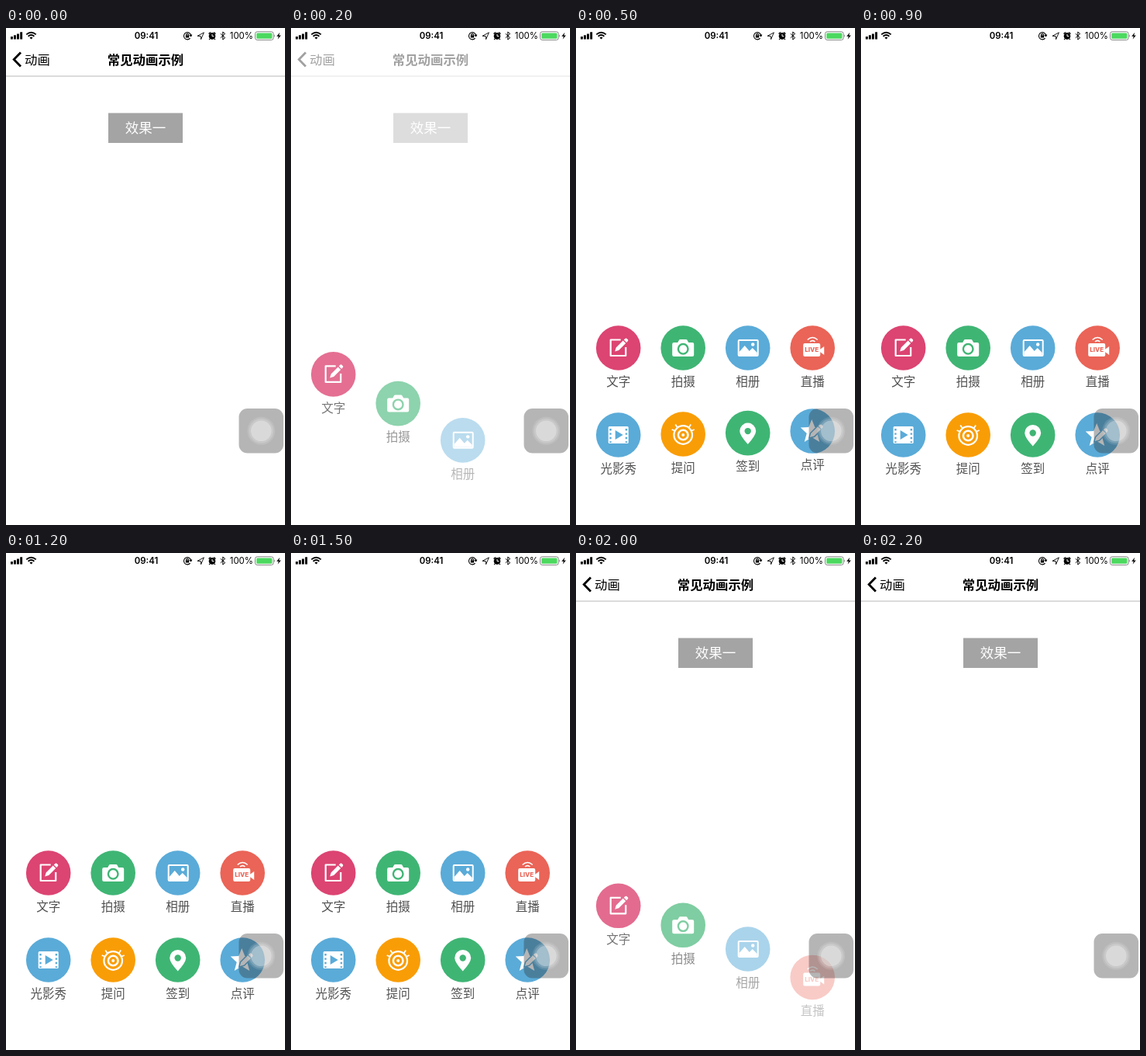
Write an HTML page that moves like this. It is 360 px wide and 640 px high and loops after 2300 ms.

```html
<!DOCTYPE html>
<html lang="zh-CN">
<head>
<meta charset="utf-8">
<title>动画</title>
<style>
  html, body { margin: 0; width: 100%; height: 100%; overflow: hidden; background: #fff; }
  svg { display: block; width: 360px; height: 640px; }
  text { font-family: "Noto Sans CJK SC", "Noto Sans CJK", sans-serif; }
  .mid { text-anchor: middle; }
  .latin { font-family: Inter, Roboto, sans-serif; font-size: 11.4px; }
  .label { font-size: 15.5px; fill: #505050; text-anchor: middle; }
  .line { fill: none; stroke: #fff; }
  .thin { fill: none; stroke: #000; }
</style>
</head>
<body>
<svg viewBox="0 0 360 640">
  <defs>
    <g id="edit">
      <path class="line" d="M3-10.5H-10V10H9.5V-1" stroke-width="2.2" stroke-linejoin="round"/>
      <path fill="#fff" d="M-4.5 4.5L-3-.5 6-9.5 9.5-6 .5 3zM7-10.5L9-12.3Q10-13 11-12L12.3-10.7Q13-9.7 12.2-8.8L10.5-7z"/>
    </g>
    <g id="camera">
      <path fill="#fff" d="M-12-7H-7L-5-10.5Q-4.6-11-4-11H4Q4.6-11 5-10.5L7-7H12Q14-7 14-5V9Q14 11 12 11H-12Q-14 11-14 9V-5Q-14-7-12-7Z"/>
      <circle cy="1.3" r="6.3" fill="none" stroke="currentColor" stroke-width="2.4"/>
    </g>
    <g id="photo">
      <rect class="line" x="-12" y="-10" width="25" height="20" rx="1" stroke-width="2"/>
      <path fill="#fff" d="M-11 8V5L-4-3 2 4 6 0 12 6V9H-11Z"/>
      <circle cx="6.5" cy="-4.5" r="2.2" fill="#fff"/>
    </g>
    <g id="live">
      <rect x="-12" y="-6" width="22" height="17" rx="2" fill="#fff"/>
      <path fill="#fff" d="M9.5 2L15-2V9L9.5 5z"/>
      <path class="line" stroke-width="1.6" d="M-6.5-10.5Q0-16.5 6.5-10.5M-3.2-8Q0-10.8 3.2-8"/>
      <text class="mid" x="-1" y="5.4" fill="currentColor" style="font:800 8px Inter,sans-serif">LIVE</text>
    </g>
    <g id="film">
      <rect x="-13" y="-11" width="26" height="22" rx="1.5" fill="#fff"/>
      <path fill="none" stroke="currentColor" stroke-width="2.4" stroke-dasharray="2.4 3" d="M-10.2-8V10M10.2-8V10"/>
      <path fill="currentColor" d="M-4-6L6 0-4 6z"/>
    </g>
    <g id="ask">
      <circle class="line" cy="1" r="11.8" stroke-width="2.2"/>
      <circle class="line" cy="1" r="6.3" stroke-width="2.5"/>
      <circle cy="1" r="2" fill="#fff"/>
      <path class="line" stroke-width="1.8" d="M-14.5-6L-10-4M14.5-6L10-4M-10-12.5L-7-8M10-12.5L7-8"/>
    </g>
    <g id="pin">
      <path fill="#fff" d="M0 14.5Q-10.5 3-10.5-2.5A10.5 10.5 0 0 1 10.5-2.5Q10.5 3 0 14.5Z"/>
      <circle cy="-2.5" r="4.2" fill="currentColor"/>
    </g>
    <g id="star">
      <path fill="#fff" d="M-1-15L3-5 14-4.5 6 3 9 14-1 8-10.5 14-7.5 3-15.5-4.5-5-5z"/>
      <path fill="#fff" stroke="currentColor" stroke-width="3" paint-order="stroke" d="M-3.5 8L-2 3 9-8Q10.5-9.3 12-8L12.8-7Q14-5.5 12.8-4.2L2 6.5z"/>
      <path fill="none" stroke="currentColor" stroke-width="1.2" d="M7-6.5L11-2.5"/>
    </g>
  </defs>

  <rect width="360" height="640" fill="#fff"/>

  <g id="page">
    <path d="M19 31.5L10.2 40.5 19 49.5" fill="none" stroke="#000" stroke-width="2.8"/>
    <text x="24" y="46.6" font-size="16.4">动画</text>
    <text class="mid" x="180" y="46.6" font-size="16.4" font-weight="700">常见动画示例</text>
    <path d="M0 62H360" stroke="#b8b8b8"/>
    <rect x="132" y="109.5" width="96" height="38.5" fill="#a4a4a4"/>
    <text class="mid" x="180" y="135.2" font-size="17.5" fill="#fff">效果一</text>
  </g>

  <g id="menu"></g>

  <g id="status">
    <path d="M6 11h2.9v3.5h-2.9zM10 9.3h2.9v5.2h-2.9zM14 7.4h2.9v7.1h-2.9zM18.2 5.2h2.9v9.3h-2.9z"/>
    <path class="thin" stroke-width="1.9" d="M26.3 8.4Q32.5 3 38.7 8.4M28.6 10.8Q32.5 7.4 36.4 10.8"/>
    <path d="M30.5 12.4Q32.5 10.8 34.5 12.4L32.5 14.6z"/>
    <text class="latin mid" x="181" y="14" font-weight="600">09:41</text>
    <path class="thin" stroke-width="1.1" d="M237.6 13.2A4.6 4.6 0 1 1 238.6 9.6M236.8 9L238.7 10.6 239.8 8.4M232.6 9.6V8.4Q234 6.6 235.4 8.4V9.6"/>
    <rect x="231.8" y="9.3" width="4.4" height="3.2"/>
    <path class="thin" stroke-width=".9" d="M247 10.3L255.4 5.8 251.6 14.6 251.2 10.5z"/>
    <circle cx="266" cy="10.4" r="4.3"/>
    <path class="thin" stroke-width="1.3" d="M261.5 7.5L264 5.4M270.5 7.5L268 5.4M263 14L262.2 15M269 14L269.8 15"/>
    <path d="M266 7.8V10.6H268.4" fill="none" stroke="#fff"/>
    <path class="thin" d="M276.8 7.3L282.6 12.6 279.8 15V5L282.6 7.4 276.8 12.7"/>
    <text class="latin" x="288.8" y="14">100%</text>
    <rect x="321.5" y="4.8" width="23.6" height="10.6" rx="2.6" fill="#fff" stroke="#777" stroke-width=".9"/>
    <rect x="323.2" y="6.4" width="20.2" height="7.4" rx="1.3" fill="#4cd95f"/>
    <path d="M346.2 8.2Q348 10 346.2 12z" fill="#777"/>
    <path d="M353.2 5.8L349.2 10.8H351.8L350.6 14.6 354.8 9.4H352.2z"/>
  </g>

  <g id="assist">
    <rect x="300.5" y="490" width="57.5" height="57.5" rx="11" fill="rgb(45,45,45)" fill-opacity=".35"/>
    <g fill="#fff" transform="translate(329.3 518.8)">
      <circle r="18" fill-opacity=".12"/>
      <circle r="15.8" fill-opacity=".17"/>
      <circle r="13.3" fill-opacity=".3"/>
    </g>
  </g>
</svg>

<script>
  const LOOP = 2300, STEP = 100, DROP = 200;
  const PINK = '#dc4472', GREEN = '#3fb574', BLUE = '#5aabd8', RED = '#ea6457', ORANGE = '#f99d06';

  // shape, label, colour, time of entry, time of exit
  const items = [
    ['edit', '文字', PINK, 123, 1885],
    ['camera', '拍摄', GREEN, 141, 1855],
    ['photo', '相册', BLUE, 159, 1825],
    ['live', '直播', RED, 203, 1795],
    ['film', '光影秀', BLUE, 224, 1723],
    ['ask', '提问', ORANGE, 268, 1685],
    ['pin', '签到', GREEN, 282, 1649],
    ['star', '点评', BLUE, 300, 1630]
  ];

  const menu = document.getElementById('menu');
  const page = document.getElementById('page');

  menu.innerHTML = items.map(([shape, label, color]) =>
    `<g color="${color}"><circle r="28.8" fill="currentColor"/>` +
    `<use href="#${shape}"/><text class="label" y="48.8">${label}</text></g>`).join('');

  const clamp = v => Math.min(1, Math.max(0, v));

  // Underdamped spring, from 1 towards 0, at rest after one swing
  function spring(ms) {
    const a = Math.max(0, ms) * 0.022, k = 0.87;
    if (a > 1.8 * Math.PI) return 0;
    return Math.exp(-k * a) * (Math.cos(a) + k * Math.sin(a));
  }

  function pose(t, enter, leave) {
    if (t < leave) return { drop: spring(t - enter), alpha: clamp((t - enter) / 100) };
    const drop = clamp((t - leave) / 250) ** 2;
    return { drop, alpha: 1 - drop };
  }

  function draw(t) {
    page.setAttribute('opacity', t < 1000 ? clamp((280 - t) / 220) : clamp((t - 1750) / 250));
    items.forEach(([, , , enter, leave], i) => {
      const { drop, alpha } = pose(t, enter, leave);
      const x = 54.7 + (i % 4) * 83.5;
      const y = (i < 4 ? 412 : 524) + drop * DROP;
      const node = menu.children[i];
      node.setAttribute('transform', `translate(${x} ${y.toFixed(2)})`);
      node.setAttribute('opacity', alpha);
    });
  }

  const start = performance.now();
  function tick() {
    const t = (performance.now() - start) % LOOP;
    draw(Math.floor(t / STEP) * STEP);
    requestAnimationFrame(tick);
  }
  tick();
</script>
</body>
</html>
```
